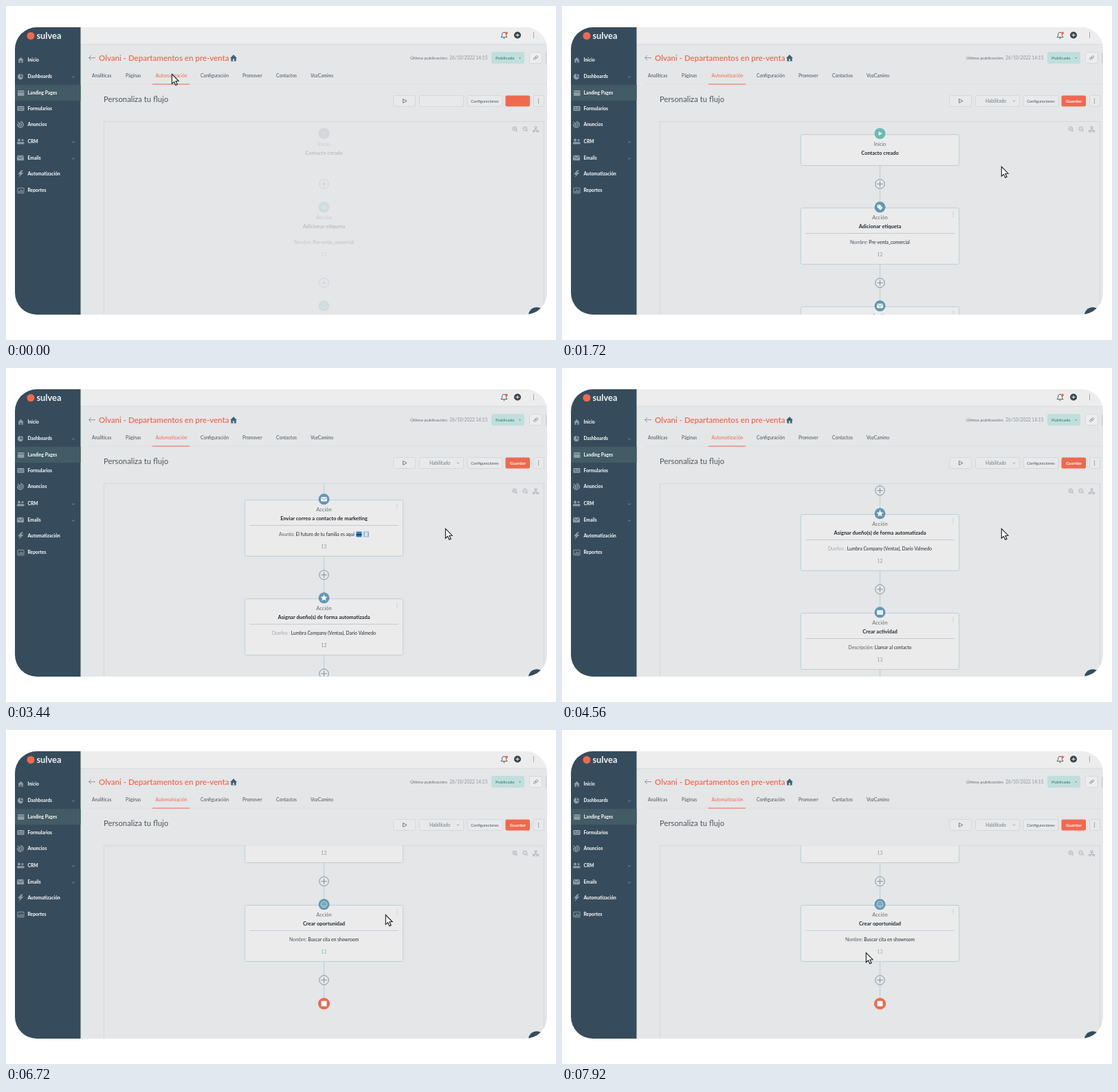
Recreate the animation shown at these times as an HTML page with a canvas. Size 800 by 487 pixels, loop 7.96 s.

```html
<!DOCTYPE html>
<html lang="es">
<head>
<meta charset="utf-8">
<title>Flujo</title>
<style>
html, body { margin: 0; width: 100%; height: 100%; overflow: hidden; background: #fff; }
canvas { display: block; width: 800px; height: 487px; }
</style>
</head>
<body>
<canvas id="stage"></canvas>
<script>
const LOOP = 7960;
const FONT = 'Lato, "Open Sans", sans-serif';
const canvas = document.getElementById('stage');
const c = canvas.getContext('2d');
const dpr = window.devicePixelRatio || 1;
canvas.width = 800 * dpr;
canvas.height = 487 * dpr;

const INK = '#4a545d', GRAY = '#8b9197', ORANGE = '#f0694f', NAVY = '#364c5c';
const BLUE = '#6398b2', TEAL = '#6fbab0', PAPER = '#ebebec', BACK = '#e4e6e8', EDGE = '#d5d8da';

const clamp = v => Math.min(1, Math.max(0, v));
const smooth = v => v * v * (3 - 2 * v);

function text(s, x, y, size, color, weight = 400, align = 'left') {
  c.font = `${weight} ${size}px ${FONT}`;
  c.textAlign = align;
  c.fillStyle = color;
  c.fillText(s, x, y + size * 0.34);
}

function box(x, y, w, h, r, fill, stroke, lw = 1) {
  c.beginPath();
  c.roundRect(x, y, w, h, r);
  if (fill) { c.fillStyle = fill; c.fill(); }
  if (stroke) { c.strokeStyle = stroke; c.lineWidth = lw; c.stroke(); }
}

function disc(x, y, r, fill, stroke, lw = 1) {
  c.beginPath();
  c.arc(x, y, r, 0, Math.PI * 2);
  if (fill) { c.fillStyle = fill; c.fill(); }
  if (stroke) { c.strokeStyle = stroke; c.lineWidth = lw; c.stroke(); }
}

function trace(pts, x, y) {
  c.beginPath();
  for (let i = 0; i < pts.length; i += 2) c.lineTo(x + pts[i], y + pts[i + 1]);
}

function line(pts, color, lw = 1, x = 0, y = 0) {
  trace(pts, x, y);
  c.strokeStyle = color;
  c.lineWidth = lw;
  c.stroke();
}

function poly(pts, color, x, y) {
  trace(pts, x, y);
  c.closePath();
  c.fillStyle = color;
  c.fill();
}

function chevron(x, y, color, s = 2) {
  line([-s, -s / 2, 0, s / 2, s, -s / 2], color, 0.9, x, y);
}

function dots(x, y, gap, color, r = 0.75) {
  for (let i = -1; i <= 1; i++) disc(x, y + i * gap, r, color);
}

function house(x, y, s, color, door) {
  poly([-5, 0, 0, -5, 5, 0, 3.7, 0, 3.7, 4.5, -3.7, 4.5, -3.7, 0].map(v => v * s), color, x, y);
  box(x - 1.1 * s, y + 1 * s, 2.2 * s, 3.5 * s, 0, door);
}

function envelope(x, y, w, h, color, fold) {
  box(x - w / 2, y - h / 2, w, h, 1, color);
  line([-w / 2, -h / 2 + 0.6, 0, 0.8, w / 2, -h / 2 + 0.6], fold, 0.9, x, y);
}

const SIDE = '#8c9ca7';
const sideIcons = {
  home: y => house(21.5, y, 0.85, SIDE, NAVY),
  pie(y) {
    disc(21, y + 0.5, 4.2, SIDE);
    line([0, -5, 0, 0.5, 5, 0.5], NAVY, 1.2, 21.5, y);
  },
  pages(y) {
    box(17, y - 4, 9.5, 8, 1, SIDE);
    line([17, y - 1.7, 26.5, y - 1.7], '#465d68', 0.8);
  },
  form(y) {
    box(16.5, y - 3.5, 10, 7, 1, SIDE);
    line([18, y - 1, 21, y - 1], NAVY, 1);
    line([22.5, y - 1, 25, y - 1], NAVY, 1);
    line([18, y + 1.5, 25, y + 1.5], NAVY, 0.8);
  },
  target(y) {
    c.beginPath();
    c.arc(21, y, 4.2, -1.6, 3.4);
    c.strokeStyle = SIDE;
    c.lineWidth = 1.4;
    c.stroke();
    disc(21, y, 2, null, SIDE, 1.1);
    line([17, y - 4, 21, y], SIDE, 1.2);
  },
  people(y) {
    for (const [x, s] of [[19, 1], [24, 0.85]]) {
      disc(x, y - 2, 1.9 * s, SIDE);
      box(x - 3 * s, y + 0.8, 6 * s, 3.2, 1.3, SIDE);
    }
  },
  mail: y => envelope(21, y, 10, 7.5, SIDE, NAVY),
  bolt: y => poly([1, -5, -4, 1, -0.5, 1, -2.5, 5.5, 4.5, -1.5, 1, -1.5, 4, -5], SIDE, 21, y),
  chart(y) {
    box(17, y - 3.7, 9, 7.6, 0.5, null, SIDE, 1);
    [2, 4, 3].forEach((h, i) => box(18.5 + i * 2.3, y + 2.8 - h, 1.4, h, 0, SIDE));
  }
};

const menu = [
  ['Inicio', 79, 'home'], ['Dashboards', 102.5, 'pie', 1], ['Landing Pages', 127, 'pages'],
  ['Formularios', 149.5, 'form'], ['Anuncios', 173, 'target'], ['CRM', 197.5, 'people', 1],
  ['Emails', 221.5, 'mail', 1], ['Automatización', 244.5, 'bolt'], ['Reportes', 269, 'chart']
];

function sidebar() {
  box(13, 31, 95.5, 419, 0, NAVY);
  box(13, 115, 95.5, 23, 0, '#425b65');
  disc(36, 43.5, 5.5, ORANGE);
  text('sulvea', 44.5, 43.5, 12.8, '#f1f3f4', 700);
  for (const [name, y, icon, more] of menu) {
    sideIcons[icon](y);
    text(name, 31.5, y, 6.7, '#f1f3f4', 800);
    if (more) chevron(98, y + 1, SIDE, 1.8);
  }
}

const tabs = [
  ['Analíticas', 125], ['Páginas', 174], ['Automatización', 217.5], ['Configuración', 283],
  ['Promover', 344], ['Contactos', 393], ['VozCamino', 443]
];

function header() {
  box(108, 31, 679, 25, 0, '#ededed');
  line([108, 56, 787, 56], '#d8dadc');

  // bell, add, separator
  poly([-4.5, 3, -3, 1, -3, -1.5, -1.5, -4, 1.5, -4, 3, -1.5, 3, 1, 4.5, 3], '#ededed', 724.5, 42.5);
  c.strokeStyle = INK;
  c.lineWidth = 0.9;
  c.stroke();
  line([723.3, 47.2, 725.7, 47.2], INK, 1);
  disc(728, 39.5, 1.9, ORANGE);
  disc(744, 42.5, 5, '#3b444c');
  line([741.4, 42.5, 746.6, 42.5], '#eee', 1.1);
  line([744, 39.9, 744, 45.1], '#eee', 1.1);
  line([767.5, 38, 767.5, 47], '#a5a9ad');

  line([130, 75.5, 120.5, 75.5], GRAY, 0.9);
  line([124, 72, 120.5, 75.5, 124, 79], GRAY, 0.9);
  text('Olvani - Departamentos en pre-venta', 135, 76, 11.5, ORANGE, 600);
  house(331, 76, 1, '#3f6078', '#b7d3df');

  text('Última publicación:', 588, 76, 6.5, '#666e75');
  text('26/10/2022 14:15', 645.3, 76, 6.6, '#8f969b');
  box(706, 67, 48, 17, 2, '#c0dfdc');
  text('Publicada', 712, 75.5, 6.4, '#4d908b', 700);
  poly([-1.5, -0.8, 1.5, -0.8, 0, 1], '#4d908b', 747.5, 75.8);
  box(761.5, 67.5, 18, 16, 2, '#ededee', EDGE);
  c.save();
  c.translate(770.5, 75.5);
  c.rotate(-0.7);
  box(-3.6, -1.3, 4, 2.6, 1.3, null, GRAY, 0.9);
  box(-0.4, -1.3, 4, 2.6, 1.3, null, GRAY, 0.9);
  c.restore();
  line([785.5, 68, 785.5, 84], '#c5c8cb');

  line([120, 114, 787, 114], '#dcdee0');
  for (const [name, x] of tabs) text(name, x, 101.8, 6.7, x === 217.5 ? ORANGE : INK);
  line([213, 114, 267, 114], ORANGE, 1);
}

function toolbar(shown) {
  text('Personaliza tu flujo', 142, 136.5, 11.3, '#4f575e');
  const btn = (x, w) => box(x + 0.5, 130.5, w, 16, 2, '#e7e9eb', EDGE);
  btn(563, 32);
  line([-2.5, -2.8, 3, 0, -2.5, 2.8, -2.5, -3], '#6a7279', 0.9, 580, 138.5);
  btn(601, 64);
  btn(670.5, 51);
  text('Configuraciones', 696.5, 138.8, 5.7, INK, 400, 'center');
  box(726.5, 130.5, 35.5, 16, 2, ORANGE);
  btn(767, 15);
  dots(774.5, 138.5, 2.7, '#6a7279');
  c.globalAlpha = shown;
  text('Habilitado', 616, 138.5, 6.7, '#737b82');
  chevron(657.5, 138.5, '#8a9197', 1.6);
  text('Guardar', 744.5, 138.5, 6.4, '#fff', 700, 'center');
  c.globalAlpha = 1;
}

function boardTools() {
  const tone = '#a3a9ae';
  for (const x of [739.8, 754.8]) {
    disc(x, 179, 2.9, null, tone, 0.8);
    line([x + 2, 181, x + 4, 183], tone, 1);
    line([x - 1.4, 179, x + 1.4, 179], tone, 0.7);
  }
  line([739.8, 177.6, 739.8, 180.4], tone, 0.7);
  box(769, 176, 3, 2.6, 0, null, tone, 0.8);
  line([770.5, 178.6, 770.5, 181, 768, 182], tone, 0.8);
  line([770.5, 181, 773, 182], tone, 0.8);
  box(766.4, 181.4, 2.6, 2.2, 0, null, tone, 0.8);
  box(772, 181.4, 2.6, 2.2, 0, null, tone, 0.8);
}

const CX = 462.5, STEP = 144, FIRST = 294;

const nodeIcons = {
  tag(y) {
    poly([-4, -3.5, 0, -3.5, 4.2, 0.7, 0.7, 4.2, -4, 0], '#fff', CX, y);
    disc(CX - 2.2, y - 1.8, 0.8, BLUE);
  },
  mail: y => envelope(CX, y, 9, 6.4, '#f2f5f6', BLUE),
  star(y) {
    const pts = [];
    for (let i = 0; i < 10; i++) {
      const a = i * Math.PI / 5 - Math.PI / 2, r = i % 2 ? 2.3 : 5.2;
      pts.push(r * Math.cos(a), r * Math.sin(a));
    }
    poly(pts, '#fff', CX, y);
  },
  task(y) {
    box(CX - 4.5, y - 3.4, 9, 6.8, 1, '#f2f5f6');
    line([CX - 4.5, y - 2, CX + 4.5, y - 2], '#b9d0dc', 0.7);
  },
  smile(y) {
    disc(CX, y, 4.3, null, '#dfeaf0', 1);
    disc(CX - 1.5, y - 1, 0.7, '#dfeaf0');
    disc(CX + 1.5, y - 1, 0.7, '#dfeaf0');
    c.beginPath();
    c.arc(CX, y + 0.3, 2, 0.2, Math.PI - 0.2);
    c.stroke();
  }
};

const cards = [
  ['tag', 'Adicionar etiqueta', 'Nombre: ', 'Pre-venta_comercial', 12],
  ['mail', 'Enviar correo a contacto de marketing', 'Asunto: ', 'El futuro de tu familia es aquí', 13],
  ['star', 'Asignar dueño(s) de forma automatizada', 'Dueños : ', 'Lumbra Company (Ventas), Darío Valmedo', 12],
  ['task', 'Crear actividad', 'Descripción: ', 'Llamar al contacto', 13],
  ['smile', 'Crear oportunidad', 'Nombre: ', 'Buscar cita en showroom', 13]
];

function plus(y) {
  disc(CX, y, 6.8, BACK, '#7d939f', 1);
  line([CX - 4.2, y, CX + 4.2, y], '#7d939f', 1);
  line([CX, y - 4.2, CX, y + 4.2], '#7d939f', 1);
}

function panel(y, h, alpha) {
  c.globalAlpha = alpha;
  box(347.5, y + 0.5, 230, h - 1, 2, PAPER, '#bccfd5');
}

function detail(label, value, y, extra) {
  c.font = `400 6.7px ${FONT}`;
  const lw = c.measureText(label).width, vw = c.measureText(value).width;
  const x = CX - (lw + vw + extra) / 2;
  text(label, x, y, 6.7, label.startsWith('Due') ? '#a3a9ae' : '#596168');
  text(value, x + lw, y, 6.7, '#252d33');
  if (!extra) return;
  const ex = x + lw + vw + 2.5;
  box(ex, y - 4, 8, 8, 1, '#2f7fc0');
  box(ex, y - 0.5, 8, 2, 0, '#1f4468');
  box(ex + 10.5, y - 4, 8, 8, 0.5, '#8fb6d2');
  box(ex + 12.5, y - 3, 4, 6, 0, '#dbe7ee');
}

function flow(scroll, shown) {
  const faint = 0.2 + 0.8 * shown;
  c.save();
  c.beginPath();
  c.rect(143, 168.5, 639, 282);
  c.clip();
  c.translate(0, -scroll);

  c.globalAlpha = shown;
  line([CX, 187, CX, FIRST + STEP * 5], '#b9d0d5', 1);
  panel(187, 46, shown);
  c.globalAlpha = faint;
  disc(CX, 186, 8, shown < 0.5 ? '#8f9ba0' : TEAL);
  poly([-2, -3, 3.2, 0, -2, 3], '#fff', CX, 186);
  text('Inicio', CX, 201, 7.4, '#666d73', 400, 'center');
  text('Contacto creado', CX, 214.2, 7.4, '#20282e', 700, 'center');
  plus(259.5);

  cards.forEach(([icon, title, label, value, count], i) => {
    const y = FIRST + i * STEP;
    panel(y, 83, shown);
    line([354, y + 37.5, 571, y + 37.5], i === 4 ? '#b9d6d8' : '#c4c9cc', 1);
    dots(569, y + 10, 3.1, '#b0b6ba', 0.7);
    c.globalAlpha = faint;
    disc(CX, y - 0.7, 8, shown < 0.5 ? TEAL : BLUE);
    nodeIcons[icon](y - 0.7);
    text('Acción', CX, y + 14, 7.5, '#666d73', 400, 'center');
    text(title, CX, y + 27, 7.5, '#20282e', 700, 'center');
    detail(label, value, y + 50.4, i === 1 ? 21 : 0);
    text(count, CX, y + 68.6, 6.8, i === 4 ? '#7cb5b0' : '#8e979c', 400, 'center');
    plus(y + 109.7);
  });

  const end = FIRST + STEP * 5;
  disc(CX, end, 8.6, ORANGE);
  box(CX - 4, end - 4, 8, 8, 1.2, '#fff');
  c.restore();
}

// One wheel notch each
const NOTCH = 123;
const notches = [2050, 2830, 3620, 5130, 5880];
const scrollAt = t => notches.reduce((sum, s) => sum + NOTCH * smooth(clamp((t - s) / 260)), 0);

function cursorAt(t) {
  if (t < 6420) {
    const left = 1 - clamp(t / 1150);
    return [240 + 399 * (1 - left ** 3), 99 + 135 * (1 - left ** 1.4)];
  }
  const p = 1 - (1 - clamp((t - 6420) / 1190)) ** 2;
  return [639 - 197 * p, 234 + 90.5 * p ** 1.15];
}

function cursor([x, y]) {
  poly([0.3, 0.3, 0.3, 14.2, 3.5, 11.3, 5.8, 16.3, 8.1, 15.3, 5.9, 10.4, 10, 10.2], '#fff', x, y);
  c.strokeStyle = '#15181a';
  c.lineWidth = 1.1;
  c.stroke();
}

function bubble() {
  disc(772, 451.5, 12.3, NAVY);
  c.beginPath();
  c.arc(772, 451, 4.5, Math.PI, 0);
  c.strokeStyle = '#cfd8dd';
  c.lineWidth = 1.2;
  c.stroke();
}

function draw(t) {
  const shown = smooth(clamp(t / 320));
  c.setTransform(dpr, 0, 0, dpr, 0, 0);
  c.globalAlpha = 1;
  box(0, 0, 800, 487, 0, '#fff');
  c.save();
  c.beginPath();
  c.roundRect(13, 31, 774, 419, 32);
  c.clip();
  box(13, 31, 774, 419, 0, BACK);
  header();
  sidebar();
  toolbar(shown);
  line([142.5, 450, 142.5, 168.5, 782.5, 168.5, 782.5, 450], EDGE);
  flow(scrollAt(t), shown);
  boardTools();
  bubble();
  c.restore();
  cursor(cursorAt(t));
}

const start = performance.now();
function tick(now) {
  draw(Math.max(0, now - start) % LOOP);
  requestAnimationFrame(tick);
}
draw(0);
requestAnimationFrame(tick);
</script>
</body>
</html>
```
